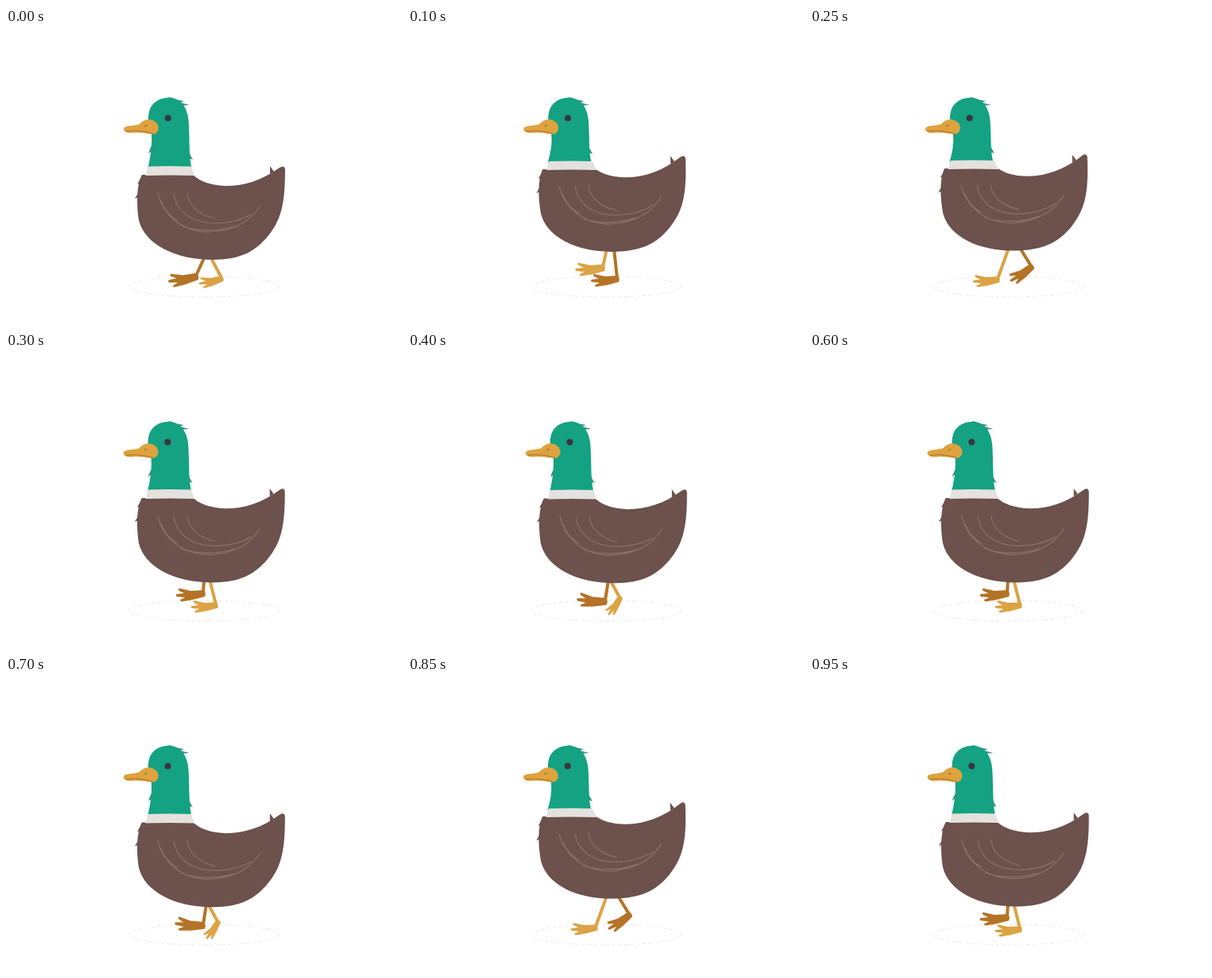
Recreate the animation shown at these times as an HTML page with a canvas. Size 498 px wide and 373 px high, loop 1 s.

```html
<!DOCTYPE html>
<html lang="en">
<head>
<meta charset="utf-8">
<title>Walking duck</title>
<style>
  html, body { margin: 0; width: 100%; height: 100%; overflow: hidden; background: #fff; }
  canvas { display: block; width: 498px; height: 373px; }
</style>
</head>
<body>
<canvas id="stage"></canvas>
<script>
const W = 498, H = 373, STEP = 50, LOOP = 1000;
const canvas = document.getElementById('stage');
const ctx = canvas.getContext('2d');
const ratio = window.devicePixelRatio || 1;
canvas.width = W * ratio;
canvas.height = H * ratio;

const FAR = '#b47326', NEAR = '#dba345';

// lift: 0 = body low, 1 = body high
// legs: hip x, ankle x, ankle y, foot angle, foot scale
const POSES = {
  A: { lift: 0,    far: [250, 239, 312, -0.1, 1.08],  near: [257, 271, 315, -0.14, 0.88] },
  B: { lift: 0.07, far: [252, 248, 313, 0.14, 1.08],  near: [254, 266, 309, -0.9, 0.8] },
  C: { lift: 0.88, far: [259, 263, 315, 0, 1],        near: [250, 245, 301, 0, 1.05] },
  D: { lift: 0.94, far: [261, 274, 313, -0.1, 0.97],  near: [250, 233, 313, 0.05, 0.98] },
  E: { lift: 1,    far: [264, 278, 300, -0.52, 0.98], near: [250, 236, 316, 0, 0.95] },
  F: { lift: 0.14, far: [249, 248, 303, 0, 1.04],     near: [256, 264, 318, 0, 0.95] }
};
const ORDER = 'ABCCDEFABCDEFABCDEFF';

const BODY = new Path2D('M171 185C164 198 164 222 167 242C174 272 212 292 260 292' +
  'C296 292 313 281 328 264C346 243 351 222 351 178Q350 172 344 176' +
  'C322 192 300 199 276 199C256 198 244 193 235 185Z');
const BODY_HAIR = new Path2D('M168 205L162 215L167 213ZM332 184L332 174L337 181ZM169 190L165 197L169 195Z');
const WING = new Path2D('M191 208C196 232 218 257 256 257C290 255 307 243 319 225' +
  'M195 218C199 229 206 237 215 242M211 209C214 229 230 245 262 246C282 246 298 241 308 235' +
  'M228 208C229 222 241 235 262 240M220 249C240 257 268 256 287 250');
const BEAK = new Path2D('M148 127C149 122 160 124 168 121C172 116 179 113 186 117' +
  'C194 121 193 130 188 133C182 135 170 131 161 132C153 133 148 131 148 127Z');
const BEAK_LINE = new Path2D('M151 130C160 129 172 129 184 133');
const CROWN = new Path2D('M213 90L224 92L219 94L231 97L218 98ZM201 89L207 87L208 91Z');
const FOOT = new Path2D('M1 -3L-15 -2L-29 -5Q-31 -4 -29 -2L-23 1L-32 2Q-34 3 -32 5' +
  'L-22 6L-28 9Q-28 11 -26 11L-13 9L2 5Q4 1 1 -3Z');

function fill(path, color) {
  ctx.fillStyle = color;
  ctx.fill(path);
}

function line(path, color, width) {
  ctx.strokeStyle = color;
  ctx.lineWidth = width;
  ctx.stroke(path);
}

function group(draw) {
  ctx.save();
  draw();
  ctx.restore();
}

function drawLeg([hip, x, y, angle, size], hipY, color) {
  const shin = new Path2D();
  shin.moveTo(hip, hipY);
  shin.lineTo(x, y);
  line(shin, color, 4);
  group(() => {
    ctx.translate(x, y);
    ctx.rotate(angle);
    ctx.scale(size, size);
    fill(FOOT, color);
  });
}

function drawBody(lift) {
  group(() => {
    ctx.translate(171, 230 - 8 * lift);
    ctx.rotate(-0.04 * lift);
    ctx.translate(-171, -230);
    fill(BODY_HAIR, '#6b514c');
    fill(BODY, '#6c514c');
    line(WING, 'rgba(158,134,128,.6)', 1.2);
  });
}

function drawHead(lift) {
  const base = 177 - 8 * lift;
  const bend = 160 - 4 * lift;
  group(() => {
    ctx.translate(-3 * lift, 0);
    const neck = new Path2D(`M178.5 ${base}C182 ${bend} 184 148 183 134C178 122 178 110 181 102` +
      `C186 91 198 87 209 88C224 91 230 106 230 124C231 145 230 ${bend} 233.5 ${base}Z`);
    const hair = new Path2D(`M183 148L179 ${base - 19}L184 ${base - 22}Z` +
      `M230 ${base - 20}L235 ${base - 11}L230 ${base - 13}Z`);
    fill(CROWN, '#3d8f7b');
    fill(hair, '#3d8f7b');
    fill(neck, '#14a283');
    fill(BEAK, '#dea33f');
    line(BEAK_LINE, '#bd812e', 1.5);
    const dots = new Path2D();
    dots.ellipse(176, 123, 2.5, 1.1, -0.4, 0, 7);
    fill(dots, '#b97e30');
    const eye = new Path2D();
    eye.arc(203.7, 113.5, 4, 0, 7);
    fill(eye, '#3b3440');
  });
}

function drawCollar(lift) {
  const top = 174.5 - 7.5 * lift;
  const low = 186 - 8 * lift;
  const left = 179 - 2 * lift;
  const right = 233 - 1.5 * lift;
  fill(new Path2D(`M${left} ${top}Q205 ${top - 1} ${right} ${top}L237 ${low}` +
    `Q205 ${low - 1} ${175.5 - 2 * lift} ${low}Z`), '#e5e1dd');
}

function drawGround() {
  const ring = new Path2D();
  ring.ellipse(249, 326, 94, 13, 0, 0, Math.PI * 2);
  group(() => {
    ctx.setLineDash([5, 4, 2, 6, 3, 3]);
    line(ring, '#dedede', 0.7);
  });
}

function draw(time) {
  const pose = POSES[ORDER[Math.floor((time % LOOP) / STEP)]];
  const { lift, near, far } = pose;
  const hipY = 288 - 11 * lift;
  ctx.setTransform(ratio, 0, 0, ratio, 0, 0);
  ctx.fillStyle = '#fff';
  ctx.fillRect(0, 0, W, H);
  ctx.lineCap = ctx.lineJoin = 'round';
  drawGround();
  drawLeg(far, hipY, FAR);
  drawLeg(near, hipY, NEAR);
  drawBody(lift);
  drawHead(lift);
  drawCollar(lift);
}

const start = performance.now();
function tick() {
  draw(performance.now() - start);
  requestAnimationFrame(tick);
}
tick();
</script>
</body>
</html>
```
